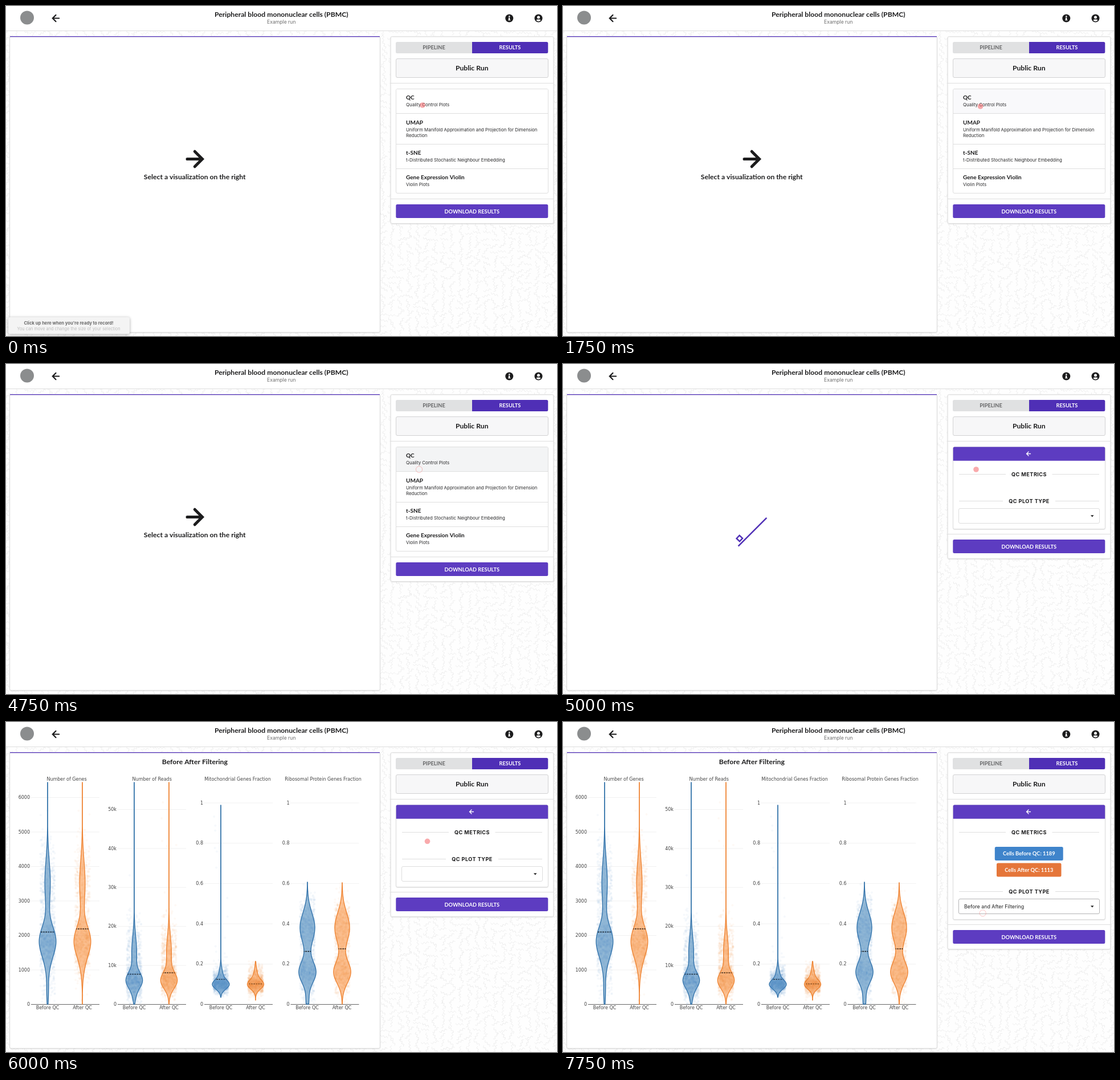
Write an HTML page with a canvas that moves like this. It is 967x579 px and loops after 8000 ms.

```html
<!DOCTYPE html>
<html lang="en">
<head>
<meta charset="utf-8">
<title>Cell run results</title>
<style>
html, body { margin: 0; width: 100%; height: 100%; overflow: hidden; background: #fff; }
canvas { display: block; }
</style>
</head>
<body>
<canvas id="stage" width="967" height="579"></canvas>
<script>
const W = 967, H = 579, LOOP = 8000, STEP = 250;
const LATO = 'Lato, sans-serif', UI = 'Inter, sans-serif', PLOT = '"DejaVu Sans", sans-serif';
const HEADING = 'bold 12.2px ' + LATO, BUTTON = 'bold 9.25px ' + LATO;
const VIOLET = '#5d3cc1', VIOLET_DARK = '#4f2fb6', BORDER = '#dedede', INK = '#1c1c1d';
const BLUE = { line: '#2f70a8', fill: 'rgba(62,128,182,.56)', dot: 'rgba(70,135,195,.05)' };
const ORANGE = { line: '#ef8230', fill: 'rgba(250,150,72,.58)', dot: 'rgba(245,140,60,.05)' };

const stage = document.getElementById('stage').getContext('2d');
let ctx = stage;

function seeded(seed) {
  return () => (seed = (seed * 16807) % 2147483647) / 2147483647;
}

function layer(paint) {
  const canvas = document.createElement('canvas');
  canvas.width = W;
  canvas.height = H;
  const outer = ctx;
  ctx = canvas.getContext('2d');
  paint();
  ctx = outer;
  return canvas;
}

function text(str, x, y, font, color = INK, align = 'left', spacing = 0) {
  ctx.font = font;
  ctx.fillStyle = color;
  ctx.textAlign = align;
  ctx.letterSpacing = spacing + 'px';
  ctx.fillText(str, x, y);
}

function line(x1, y1, x2, y2, color = BORDER, width = 1) {
  ctx.strokeStyle = color;
  ctx.lineWidth = width;
  ctx.beginPath();
  ctx.moveTo(x1, y1);
  ctx.lineTo(x2, y2);
  ctx.stroke();
}

function box(x, y, x2, y2, fill, stroke, radius = 2.5) {
  ctx.beginPath();
  ctx.roundRect(x, y, x2 - x, y2 - y, radius);
  if (fill) { ctx.fillStyle = fill; ctx.fill(); }
  if (stroke) { ctx.strokeStyle = stroke; ctx.lineWidth = 1; ctx.stroke(); }
}

function disc(x, y, r, color) {
  ctx.fillStyle = color;
  ctx.beginPath();
  ctx.arc(x, y, r, 0, Math.PI * 2);
  ctx.fill();
}

function shadowed(blur, color, paint) {
  ctx.save();
  ctx.shadowBlur = blur;
  ctx.shadowOffsetY = 1;
  ctx.shadowColor = color;
  paint();
  ctx.restore();
}

// size is the full width; dir is 1 for right, -1 for left
function arrow(x, y, size, dir, color) {
  ctx.save();
  ctx.translate(x, y);
  ctx.scale(dir * size / 32, size / 32);
  ctx.strokeStyle = color;
  ctx.lineWidth = 5;
  ctx.lineCap = 'round';
  ctx.beginPath();
  ctx.moveTo(-13, 0);
  ctx.lineTo(11, 0);
  ctx.moveTo(0, -13);
  ctx.lineTo(13, 0);
  ctx.lineTo(0, 13);
  ctx.stroke();
  ctx.restore();
}

function squiggles() {
  const rand = seeded(4711);
  ctx.fillStyle = '#fefefe';
  ctx.fillRect(0, 0, W, H);
  ctx.strokeStyle = '#ebebeb';
  ctx.lineWidth = 0.9;
  for (let gy = 44; gy < H + 12; gy += 11) {
    for (let gx = 0; gx < W + 16; gx += 15) {
      ctx.save();
      ctx.translate(gx + rand() * 5, gy + rand() * 4);
      ctx.rotate(rand() * Math.PI);
      ctx.beginPath();
      for (let s = -7; s <= 7; s += 0.5) ctx.lineTo(s, 1.3 * Math.sin(s * 1.1));
      ctx.stroke();
      ctx.restore();
    }
  }
}

function header() {
  ctx.fillStyle = '#fff';
  ctx.fillRect(0, 0, W, 43);
  line(0, 43.5, W, 43.5, '#dedede');
  disc(37, 20.5, 12, '#8b8d8e');
  arrow(87.5, 21.5, 14, -1, INK);
  text('Peripheral blood mononuclear cells (PBMC)', 483.3, 18.5, HEADING, INK, 'center');
  text('Example run', 483.3, 31, '8.6px ' + UI, '#6c6c6c', 'center');

  disc(883.3, 21.5, 7, INK);
  disc(883.3, 18.2, 1.2, '#fff');
  ctx.fillStyle = '#fff';
  ctx.fillRect(882, 20.3, 2.3, 4);
  ctx.fillRect(881.4, 24, 3.9, 1.3);

  ctx.save();
  disc(934.5, 21.5, 7, INK);
  disc(934.5, 19.8, 2.5, '#fff');
  ctx.beginPath();
  ctx.arc(934.5, 21.5, 5.4, 0, Math.PI * 2);
  ctx.clip();
  box(930.5, 23.5, 938.5, 30, '#fff', null, 2.5);
  ctx.restore();
}

function frame() {
  squiggles();
  header();
  shadowed(2, 'rgba(0,0,0,.08)', () => box(6.5, 53.5, 656.5, 572.5, '#fff', BORDER));
  line(7, 53.6, 656, 53.6, VIOLET_DARK, 1.4);
}

function sidePanel(bottom) {
  shadowed(2, 'rgba(0,0,0,.08)', () => box(675, 53.5, 961, bottom, '#fff', BORDER));
  box(684, 63, 818, 83, '#e0e1e2', null, [2.5, 0, 0, 2.5]);
  box(818, 63, 951.3, 83, VIOLET_DARK, null, [0, 2.5, 2.5, 0]);
  text('PIPELINE', 751, 76.4, BUTTON, '#636465', 'center');
  text('RESULTS', 884.5, 76.4, BUTTON, '#fff', 'center');
  box(684.5, 92.5, 951.5, 125.5, '#f7f7f8', '#d2d2d3');
  text('Public Run', 817.7, 113.4, HEADING, INK, 'center');
  line(675, 135.5, 961, 135.5);
  line(675, bottom - 43, 961, bottom - 43);
  box(684.3, bottom - 33.5, 951.3, bottom - 9.5, VIOLET);
  text('DOWNLOAD RESULTS', 817.8, bottom - 18, BUTTON, '#fff', 'center');
}

function menu(rowColor) {
  sidePanel(381.5);
  box(684.5, 145.5, 951.5, 328.5, '#fff', BORDER);
  box(685, 146, 951, 188, rowColor, null, [2, 2, 0, 0]);
  for (const y of [188.5, 242.5, 285.5]) line(685, y, 951, y);
  const items = [
    [164, 'QC', 'Quality Control Plots'],
    [207.5, 'UMAP', 'Uniform Manifold Approximation and Projection for Dimension', 'Reduction'],
    [261, 't-SNE', 't-Distributed Stochastic Neighbour Embedding'],
    [304.4, 'Gene Expression Violin', 'Violin Plots']
  ];
  for (const [y, title, ...rows] of items) {
    text(title, 702, y, 'bold 10px ' + LATO);
    rows.forEach((row, i) => text(row, 702, y + 12 + i * 10.6, '7.9px ' + UI, '#2b2b2c'));
  }
}

function ruledTitle(str, y, gapLeft, gapRight) {
  line(695, y, gapLeft, y);
  line(gapRight, y, 941, y);
  text(str, 818, y + 3.4, 'bold 9.15px ' + UI, INK, 'center', 0.46);
}

function qcPanel(loaded, focused) {
  const dy = loaded ? 57 : 0;
  sidePanel(341.5 + dy);
  shadowed(1.5, 'rgba(0,0,0,.08)', () => box(684.5, 145.5, 951.5, 289.5 + dy, '#fff', BORDER));
  box(684.7, 145.5, 951.2, 169.8, VIOLET, null, [2.5, 2.5, 0, 0]);
  arrow(817, 157.5, 8.5, -1, '#fff');
  ruledTitle('QC METRICS', 193.5, 777, 858.5);
  if (loaded) {
    box(757.8, 219, 877.7, 243, '#3f84cb');
    text('Cells Before QC: 1189', 817.8, 234.3, BUTTON, '#fff', 'center');
    box(761, 247.5, 874.5, 271.5, '#e5763a');
    text('Cells After QC: 1113', 817.8, 262.8, BUTTON, '#fff', 'center');
  }
  ruledTitle('QC PLOT TYPE', 240.5 + dy, 772, 864);
  box(694.5, 253.5 + dy, 941.5, 279.5 + dy, '#fff', focused ? '#b4b4b5' : BORDER);
  if (loaded) text('Before and After Filtering', 704, 326.5, '8.9px ' + UI, '#222');
  ctx.fillStyle = '#222';
  ctx.beginPath();
  ctx.moveTo(926, 265.3 + dy);
  ctx.lineTo(931.6, 265.3 + dy);
  ctx.lineTo(928.8, 268.4 + dy);
  ctx.fill();
}

// bumps: [height, centre y, spread]
function violin(x, top, bottom, median, tint, bumps, seed) {
  const rand = seeded(seed);
  const density = y => bumps.reduce((sum, [a, c, s]) => sum + a * Math.exp(-(((y - c) / s) ** 2)), 0);
  const half = y => Math.max(0.2, density(y));
  ctx.beginPath();
  for (let y = top; y <= bottom; y++) ctx.lineTo(x - half(y), y);
  for (let y = bottom; y >= top; y--) ctx.lineTo(x + half(y), y);
  ctx.closePath();
  ctx.fillStyle = tint.fill;
  ctx.fill();
  ctx.strokeStyle = tint.line;
  ctx.lineWidth = 1.33;
  ctx.lineJoin = 'round';
  ctx.stroke();
  ctx.save();
  ctx.clip();
  ctx.setLineDash([2.8, 1.3]);
  line(x - 12, median, x + 12, median, '#111', 1.4);
  ctx.restore();
  for (let placed = 0; placed < 1100;) {
    const y = top + rand() * (bottom - top);
    if (rand() * 16 > density(y) + 0.01) continue;
    disc(x + (rand() - 0.5) * 26, y, 2, tint.dot);
    placed++;
  }
}

function axes(left, titleX, title, ticks, unit) {
  const font = '8px ' + PLOT;
  text(title, titleX, 103.4, font, '#444', 'center');
  ticks.forEach((label, i) => {
    const y = 495.5 - i * unit;
    if (i) line(left, y, left + 120, y, '#eeeeee', 0.8);
    text(label, left - 2, y + 2.6, font, '#444', 'right');
  });
  line(left, 495.5, left + 120, 495.5, '#666', 1);
  text('Before QC', left + 29, 504.4, font, '#444', 'center');
  text('After QC', left + 90, 504.4, font, '#444', 'center');
}

function charts() {
  text('Before After Filtering', 331.3, 73.8, HEADING, INK, 'center');
  const fractions = ['0', '0.2', '0.4', '0.6', '0.8', '1'];
  axes(44, 106.5, 'Number of Genes', ['0', '1000', '2000', '3000', '4000', '5000', '6000'], 60.5);
  axes(196, 256.2, 'Number of Reads', ['0', '10k', '20k', '30k', '40k', '50k'], 68.4);
  axes(348, 406.5, 'Mitochondrial Genes Fraction', fractions, 70.7);
  axes(499.5, 556.5, 'Ribosomal Protein Genes Fraction', fractions, 70.7);

  const genes = [[13, 382, 34], [3.5, 415, 36], [4.8, 283, 56]];
  const reads = [[13.7, 454, 20], [4.3, 404, 40]];
  const ribo = [[13, 361, 37], [15, 439, 27]];
  violin(73, 106, 495, 368.5, BLUE, [...genes, [1.4, 476, 26]], 11);
  violin(134, 106, 495, 363, ORANGE, genes, 12);
  violin(225, 106, 495, 442.5, BLUE, [...reads, [1.5, 484, 14]], 13);
  violin(286, 106, 495, 440, ORANGE, reads, 14);
  violin(377, 146, 483, 451.5, BLUE, [[13.5, 461, 11], [3.5, 445, 17]], 15);
  violin(438, 420, 488, 459.5, ORANGE, [[12.5, 461, 11], [3.5, 447, 18]], 16);
  violin(529, 281, 495, 402.5, BLUE, [...ribo, [2.2, 491, 20]], 17);
  violin(590, 282, 495, 398, ORANGE, ribo, 18);
}

function bezier(x, x1, y1, x2, y2) {
  const curve = (u, a, b) => 3 * u * (1 - u) ** 2 * a + 3 * u * u * (1 - u) * b + u ** 3;
  let lo = 0, hi = 1;
  for (let i = 0; i < 24; i++) {
    const mid = (lo + hi) / 2;
    if (curve(mid, x1, x2) < x) lo = mid; else hi = mid;
  }
  return curve(lo, y1, y2);
}

function between(keys, t, ease = p => p) {
  const i = Math.max(1, keys.findIndex(k => k[0] >= t));
  const a = keys[i - 1], b = keys[i];
  const p = ease((t - a[0]) / (b[0] - a[0]));
  return a.slice(1).map((v, j) => v + (b[j + 1] - v) * p);
}

// percent of the cycle, steps climbed, rotation in degrees
const CLIMB = [
  [0, 0, -45], [5, 0, -50], [20, 1, 47], [25, 1, 45], [30, 1, 40], [45, 2, 137],
  [50, 2, 135], [55, 2, 130], [70, 3, 217], [75, 3, 220], [100, 0, -225]
];

function loader(age) {
  const em = 9.9;
  const [climbed, turn] = between(CLIMB, age % 2500 / 25, p => bezier(p, 0.79, 0, 0.47, 0.97));
  line(307.6, 319.6, 357.4, 269.8, VIOLET_DARK, 2.5);
  ctx.save();
  ctx.translate(309.5 + climbed * em, 306.3 - climbed * em);
  ctx.rotate(turn * Math.PI / 180);
  ctx.strokeStyle = VIOLET_DARK;
  ctx.lineWidth = 2.4;
  ctx.strokeRect(-3.7, -3.7, 7.4, 7.4);
  ctx.restore();
}

function prompt() {
  arrow(331.3, 268.5, 32.5, 1, INK);
  text('Select a visualization on the right', 331.2, 303.5, HEADING, INK, 'center');
}

function toast(alpha) {
  if (alpha <= 0) return;
  ctx.save();
  ctx.globalAlpha = alpha;
  shadowed(5, 'rgba(0,0,0,.35)', () => box(4, 546, 217, 575.5, '#f4f4f4', null, 3));
  text("Click up here when you're ready to record!", 110, 559.4, 'bold 7.6px ' + UI, '#6a6a6a', 'center');
  text('You can move and change the size of your selection', 110, 569.3, '7.35px ' + UI, '#bdbdbd', 'center');
  ctx.restore();
}

const POINTER = [
  [0, 731, 174], [750, 746, 169], [1250, 733, 175.5], [1750, 732.5, 176], [2250, 732.5, 176],
  [3000, 766.3, 167.3], [3500, 735, 180], [3750, 733, 181], [4500, 725, 185], [5000, 725, 185],
  [5750, 733, 182.5], [6000, 739.5, 209.3], [6500, 739.5, 209.3], [7250, 737, 322],
  [7500, 736.7, 335.3], [8000, 736.7, 335.3]
];

function pointer(t) {
  const [x, y] = between(POINTER, t);
  if (t !== 4750 && t !== 7750) return disc(x, y, 4.8, 'rgba(243,92,96,.52)');
  ctx.strokeStyle = 'rgba(243,110,110,.42)';
  ctx.lineWidth = 1;
  ctx.beginPath();
  ctx.arc(x, y, 5.6, 0, Math.PI * 2);
  ctx.stroke();
}

const backdrop = layer(frame);
const plots = layer(charts);

function draw(t) {
  ctx.drawImage(backdrop, 0, 0);
  if (t < 5000) {
    prompt();
    menu(t < 1500 ? '#fff' : t < 4500 ? '#f9f9fb' : '#f3f4f5');
    toast(1 - t / 1250);
  } else {
    if (t < 6000) loader(t - 4790);
    else ctx.drawImage(plots, 0, 0);
    qcPanel(t >= 6250, t >= 7250);
  }
  pointer(t);
}

let shown = -1;
function tick() {
  const t = Math.floor(performance.now() % LOOP / STEP) * STEP;
  if (t !== shown) draw(shown = t);
  requestAnimationFrame(tick);
}
tick();
</script>
</body>
</html>
```
